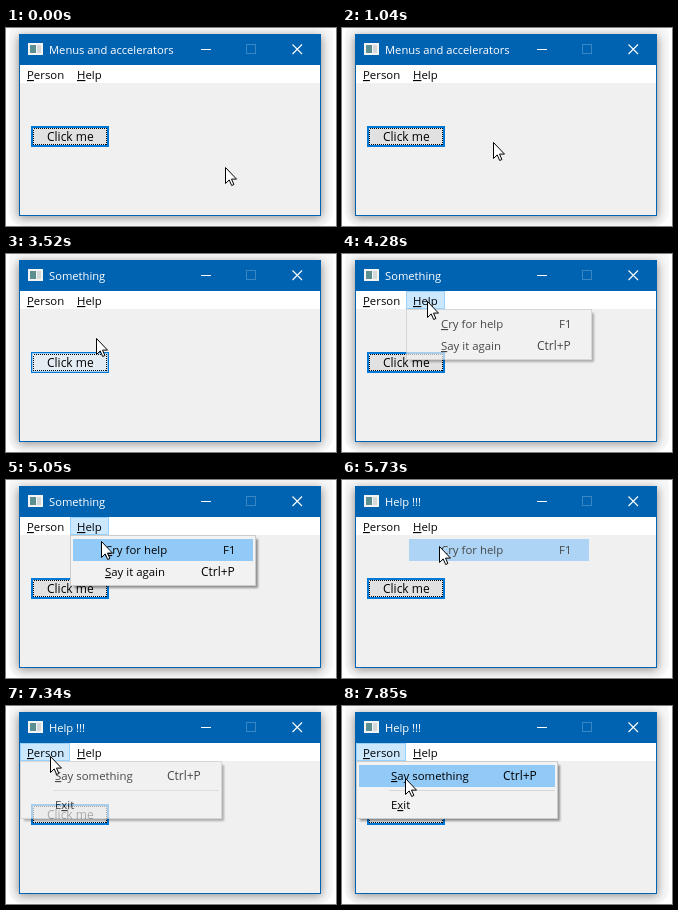
Write an HTML page that moves like this. It is 330x198 px and loops after 8 s.

```html
<!DOCTYPE html>
<html lang="en">
<head>
<meta charset="utf-8">
<title>Menus and accelerators</title>
<style>
  html, body { margin: 0; width: 100%; height: 100%; overflow: hidden; background: #fff; }
  svg { display: block; width: 330px; height: 198px; }
  text { font: 11.4px "Open Sans", "Noto Sans", sans-serif; fill: #000; white-space: pre; }
  .key { text-decoration: underline; text-underline-offset: 1px; }
  #title { font-size: 11.2px; fill: #fff; }
  #glow { filter: blur(5px); }
  .crisp { shape-rendering: crispEdges; }
  .panel { fill: #f2f2f2; stroke: #ccc; }
  .shade { fill: #000; opacity: .4; filter: blur(1px); }
  .pick { fill: #91c9f7; }
</style>
</head>
<body>
<svg viewBox="0 0 330 198">
  <rect x="3" y="-8" width="324" height="206" rx="15" fill="#f7f7f7"/>
  <rect id="glow" x="12" y="8" width="304" height="182" rx="3" opacity=".4"/>

  <g class="crisp">
    <rect x="13" y="6" width="302" height="182" fill="#0063b1"/>
    <rect x="14" y="37" width="300" height="18" fill="#fff"/>
    <rect x="14" y="55" width="300" height="132" fill="#f0f0f0"/>
    <rect x="22" y="15" width="15" height="12" fill="#f4f4f4"/>
    <rect x="24" y="17" width="6" height="8" fill="#5b8f91"/>
    <rect x="31" y="17" width="4" height="8" fill="#d4d9dc"/>
    <path d="M195 21.5h10" stroke="#fff"/>
    <rect x="240.500" y="16.500" width="9" height="9" fill="none" stroke="#3987c5"/>
  </g>
  <path d="M286.500 16.500l9.500 9.500m0-9.500l-9.500 9.500" stroke="#fff" stroke-width="1.100"/>
  <text id="title" x="43" y="26"></text>

  <g class="crisp">
    <rect id="personTab" x="14.500" y="37.500" width="49" height="17"/>
    <rect id="helpTab" x="64.500" y="37.500" width="38" height="17"/>
  </g>
  <text x="21" y="51"><tspan class="key">P</tspan>erson</text>
  <text x="71" y="51"><tspan class="key">H</tspan>elp</text>

  <g class="crisp">
    <rect x="25" y="98" width="78" height="21" fill="#0078d7"/>
    <rect x="27" y="100" width="74" height="17" fill="#e1e1e1"/>
    <rect id="hover" x="26" y="99" width="76" height="19" fill="#e5f1fb"/>
    <rect id="press" x="25.500" y="98.500" width="77" height="20" fill="#cce4f7" stroke="#005499"/>
    <rect x="27.500" y="100.500" width="73" height="16" fill="none" stroke="#000" stroke-dasharray="1 1"/>
  </g>
  <text x="41" y="113" style="font-size:12px">Click me</text>

  <g id="helpMenu">
    <rect class="shade" x="68" y="59" width="184" height="49"/>
    <rect class="panel crisp" x="64.500" y="55.500" width="185" height="50"/>
    <rect id="helpPick" class="pick crisp" x="67" y="59" width="180" height="22"/>
    <text x="99" y="74"><tspan class="key">C</tspan>ry for help</text>
    <text x="217" y="74">F1</text>
    <text x="99" y="96"><tspan class="key">S</tspan>ay it again</text>
    <text x="195" y="96" style="font-size:12px">Ctrl+P</text>
  </g>

  <g id="fadingItem">
    <rect class="pick crisp" x="67" y="59" width="180" height="22"/>
    <text x="99" y="74"><tspan class="key">C</tspan>ry for help</text>
    <text x="217" y="74">F1</text>
  </g>

  <g id="personMenu">
    <rect class="shade" x="18" y="59" width="200" height="56"/>
    <rect class="panel crisp" x="14.500" y="55.500" width="201" height="57"/>
    <rect id="personPick" class="pick crisp" x="17" y="59" width="196" height="22"/>
    <path class="crisp" d="M47 84.500H213" stroke="#d7d7d7"/>
    <text x="49" y="74"><tspan class="key">S</tspan>ay something</text>
    <text x="161" y="74" style="font-size:12px">Ctrl+P</text>
    <text x="49" y="103">E<tspan class="key">x</tspan>it</text>
  </g>

  <path id="cursor" d="M.5.500V16.500L4.200 12.900 6.700 18.500 8.900 17.500 6.500 12.100H11.500Z" fill="#fff" stroke="#000"/>
</svg>
<script>
  const LOOP = 8000;
  const $ = id => document.getElementById(id);

  // Each track holds [start time, value...]; values change in hard steps.
  const pointer = [
    [0, 219, 139], [650, 206, 133], [800, 185, 124], [920, 165, 117], [1040, 151, 114],
    [1190, 130, 110], [1310, 106, 107], [1430, 88, 105], [1580, 83, 105], [1700, 82, 105],
    [3400, 85, 99], [3520, 90, 84], [3640, 94, 70], [3760, 93, 58], [3880, 89, 51],
    [4030, 85, 47], [4930, 91, 55], [5050, 95, 61], [5200, 97, 66],
    [6590, 96, 67], [6710, 79, 63], [6830, 59, 56], [6950, 49, 53], [7070, 45, 51],
    [7190, 44, 50], [7460, 46, 54], [7610, 52, 61], [7730, 59, 68], [7850, 63, 72]
  ];
  const titles = [[0, "Menus and accelerators"], [1950, "Something"], [5730, "Help !!!"]];
  const opacity = {
    hover: [[0, 0], [1430, .4], [1580, .8], [1700, 1], [3520, .7], [3640, .4], [3760, .15], [3880, 0]],
    press: [[0, 0], [1950, 1], [2100, 0]],
    helpMenu: [[0, 0], [4280, .7], [4400, 1], [5730, 0]],
    helpPick: [[0, 0], [5050, 1]],
    fadingItem: [[0, 0], [5730, .7], [5880, .35], [6000, 0]],
    personMenu: [[0, 0], [7340, .7], [7460, 1]],
    personPick: [[0, 0], [7610, 1]]
  };
  const tabs = {
    helpTab: [[0, "off"], [3880, "hot"], [4280, "open"], [5730, "off"]],
    personTab: [[0, "off"], [6950, "hot"], [7340, "open"]]
  };
  const tabColors = {
    off: ["none", "none"],
    hot: ["#e5f3ff", "#cce8ff"],
    open: ["#cce8ff", "#99d1ff"]
  };

  const at = (track, t) => track.findLast(([start]) => start <= t).slice(1);

  function draw(now) {
    const t = now % LOOP;
    $("cursor").setAttribute("transform", `translate(${at(pointer, t)})`);

    const [title] = at(titles, t);
    if ($("title").textContent !== title) $("title").textContent = title;

    for (const id in opacity) {
      const [value] = at(opacity[id], t);
      $(id).style.opacity = value;
    }
    for (const id in tabs) {
      const [fill, stroke] = tabColors[at(tabs[id], t)[0]];
      $(id).setAttribute("fill", fill);
      $(id).setAttribute("stroke", stroke);
    }
  }

  const begin = performance.now();
  function tick() {
    draw(performance.now() - begin);
    requestAnimationFrame(tick);
  }
  tick();
</script>
</body>
</html>
```
